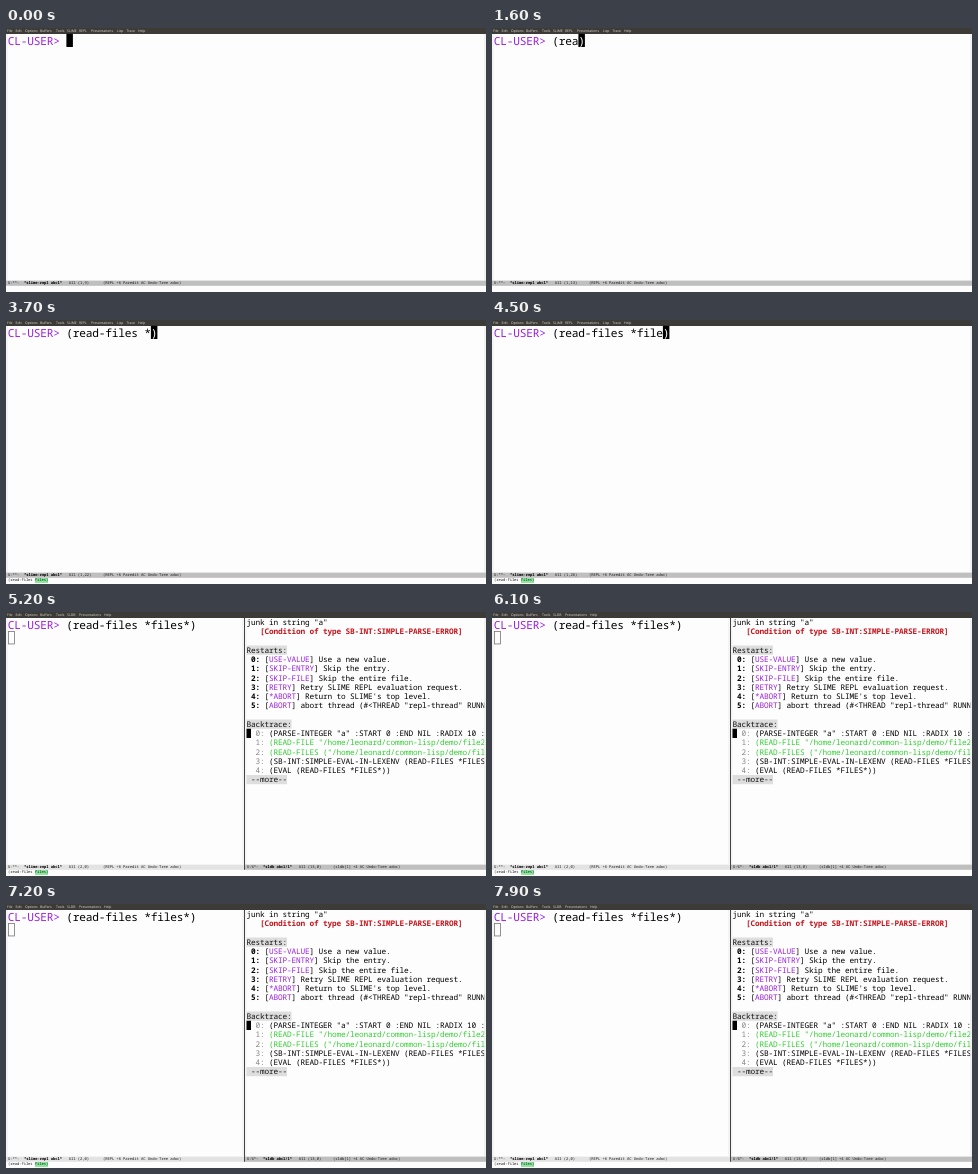
An HTML page with a canvas that plays this animation: 480x264 px, repeating every 8000 ms.

```html
<!DOCTYPE html>
<html lang="en">
<head>
<meta charset="utf-8">
<title>Lisp REPL session</title>
<style>
  html, body { margin: 0; width: 100%; height: 100%; overflow: hidden; background: #fdfdfd; }
  canvas { display: block; width: 480px; height: 264px; }
</style>
</head>
<body>
<canvas id="stage" width="480" height="264"></canvas>
<script>
const LOOP = 8000, DEBUG_AT = 5100;
const BIG = 6.5, MID = 4.5, SMALL = 2.24;    // character widths
const TOP = 5.75, BIG_ROW = 13.25, MID_ROW = 9.25;
const PURPLE = '#9b20dc', GREEN = '#32cd32', RED = '#c4141c', GRAY = '#858585';
const INPUT = '(read-files *files*';
const HEAD = ' #';                            // marks a shaded heading
const ctx = document.getElementById('stage').getContext('2d');
ctx.textRendering = 'geometricPrecision';

const rect = (x, y, w, h, color) => {
  ctx.fillStyle = color;
  ctx.fillRect(x, y, w, h);
};

// Text on a fixed character grid; returns the x after the last cell.
function mono(text, x, y, w, color = '#000', weight = 500) {
  ctx.font = `${weight} ${w / 0.58}px "Noto Sans Mono", monospace`;
  ctx.textAlign = 'center';
  ctx.fillStyle = color;
  [...text].forEach((c, i) => ctx.fillText(c, x + (i + 0.5) * w, y));
  return x + text.length * w;
}

function menu(items) {
  rect(0, 0, 480, 6, '#3c3b37');
  ctx.font = '3.45px "Open Sans", sans-serif';
  ctx.textAlign = 'left';
  ctx.fillStyle = '#dfdbd2';
  const start = { File: 1, Edit: 9.5, Options: 19, Buffers: 34, Tools: 50 };
  for (const [name, x] of Object.entries({ ...start, ...items })) ctx.fillText(name, x, 4);
}

function modeline(x, w, shade, flags, buffer, place, modes, modesX) {
  rect(x, 252.6, w, 5.2, shade);
  const y = 256.4;
  mono(flags, x + 2, y, SMALL, '#222');
  const end = mono(buffer, x + 18, y, SMALL, '#000', 700);
  mono('All ' + place, end + 3 * SMALL, y, SMALL, '#222');
  mono(modes, modesX, y, SMALL, '#222');
}

function replModeline(w, shade, place) {
  modeline(0, w, shade, 'U:**-', '*slime-repl abcl*', place,
    '(REPL +6 Paredit AC Undo-Tree adoc)', 97);
}

function hint() {
  rect(29, 258, 13, 5, '#8ee89a');
  const x = mono('(read-files ', 2, 261.3, SMALL, '#222');
  mono('files)', x, 261.3, SMALL, '#123');
}

function prompt(text) {
  const x = mono('CL-USER> ', 1.9, 16.9, BIG, PURPLE);
  return mono(text, x, 16.9, BIG);
}

function typing(n) {
  menu({ SLIME: 61, REPL: 73, Presentations: 85, Lisp: 111, Trace: 120.5, Help: 132 });
  const x = prompt(INPUT.slice(0, n));
  rect(x, TOP, BIG, BIG_ROW, '#000');
  if (n) mono(n === 9 ? 'e' : ')', x, 16.9, BIG, '#fff');
  replModeline(480, '#bfbfbf', `(1,${9 + n})`);
  if (n > 11) hint();
}

const restart = (i, name, text) =>
  [[` ${i}: `, '#000', 700], ['['], [name, PURPLE], ['] ' + text]];
const frame = (i, text, color) => [[`  ${i}: `, GRAY], [text, color]];
const ROWS = [
  [['junk in string "a"']],
  [['   [Condition of type SB-INT:SIMPLE-PARSE-ERROR]', RED, 600]],
  [],
  [['Restarts:', HEAD]],
  restart(0, 'USE-VALUE', 'Use a new value.'),
  restart(1, 'SKIP-ENTRY', 'Skip the entry.'),
  restart(2, 'SKIP-FILE', 'Skip the entire file.'),
  restart(3, 'RETRY', 'Retry SLIME REPL evaluation request.'),
  restart(4, '*ABORT', "Return to SLIME's top level."),
  restart(5, 'ABORT', 'abort thread (#<THREAD "repl-thread" RUNNING'),
  [],
  [['Backtrace:', HEAD]],
  frame(0, '(PARSE-INTEGER "a" :START 0 :END NIL :RADIX 10 :JUNK'),
  frame(1, '(READ-FILE "/home/leonard/common-lisp/demo/file2', GREEN),
  frame(2, '(READ-FILES ("/home/leonard/common-lisp/demo/file1', GREEN),
  frame(3, '(SB-INT:SIMPLE-EVAL-IN-LEXENV (READ-FILES *FILES*)'),
  frame(4, '(EVAL (READ-FILES *FILES*))'),
  [[' --more--', HEAD]]
];

function debuggerView() {
  menu({ SLDB: 61, Presentations: 73, Help: 98 });
  prompt(INPUT + ')');
  ctx.strokeStyle = '#777';
  ctx.lineWidth = 0.8;
  ctx.strokeRect(2.4, TOP + BIG_ROW + 0.5, 6, BIG_ROW - 0.8);
  replModeline(238, '#e3e3e3', '(2,0)');
  hint();

  rect(236, 6, 4.5, 246.6, '#f4f4f4');
  rect(238, 6, 1, 251.8, '#444');
  ctx.save();
  ctx.beginPath();
  ctx.rect(239, TOP, 239.3, 247);
  ctx.clip();
  ROWS.forEach((parts, r) => {
    const top = TOP + r * MID_ROW;
    let x = 240.5;
    for (const [text, color, weight] of parts) {
      const head = color === HEAD;
      if (head) rect(x, top, text.length * MID, MID_ROW, '#dedede');
      x = mono(text, x, top + 7.4, MID, head ? '#111' : color, weight);
    }
  });
  rect(240.5, TOP + 12 * MID_ROW, MID, MID_ROW, '#000');
  ctx.restore();
  modeline(239, 241, '#bfbfbf', 'U:%*-', '*sldb abcl/1*', '(13,0)',
    '(sldb[1] +4 AC Undo-Tree adoc)', 327);
}

// Keys land about 226 ms apart, on 100 ms ticks.
const keyTime = i => 800 + 100 * Math.ceil(i * 2.26);

function draw(now) {
  const t = now % LOOP;
  rect(0, 0, 480, 264, '#fdfdfd');
  rect(0, 6, 2, 246.6, '#f4f4f4');
  rect(478, 6, 2, 246.6, '#f1f1f1');
  if (t >= DEBUG_AT) debuggerView();
  else typing([...INPUT].filter((_, i) => t >= keyTime(i)).length);
  requestAnimationFrame(draw);
}
draw(0);
</script>
</body>
</html>
```
